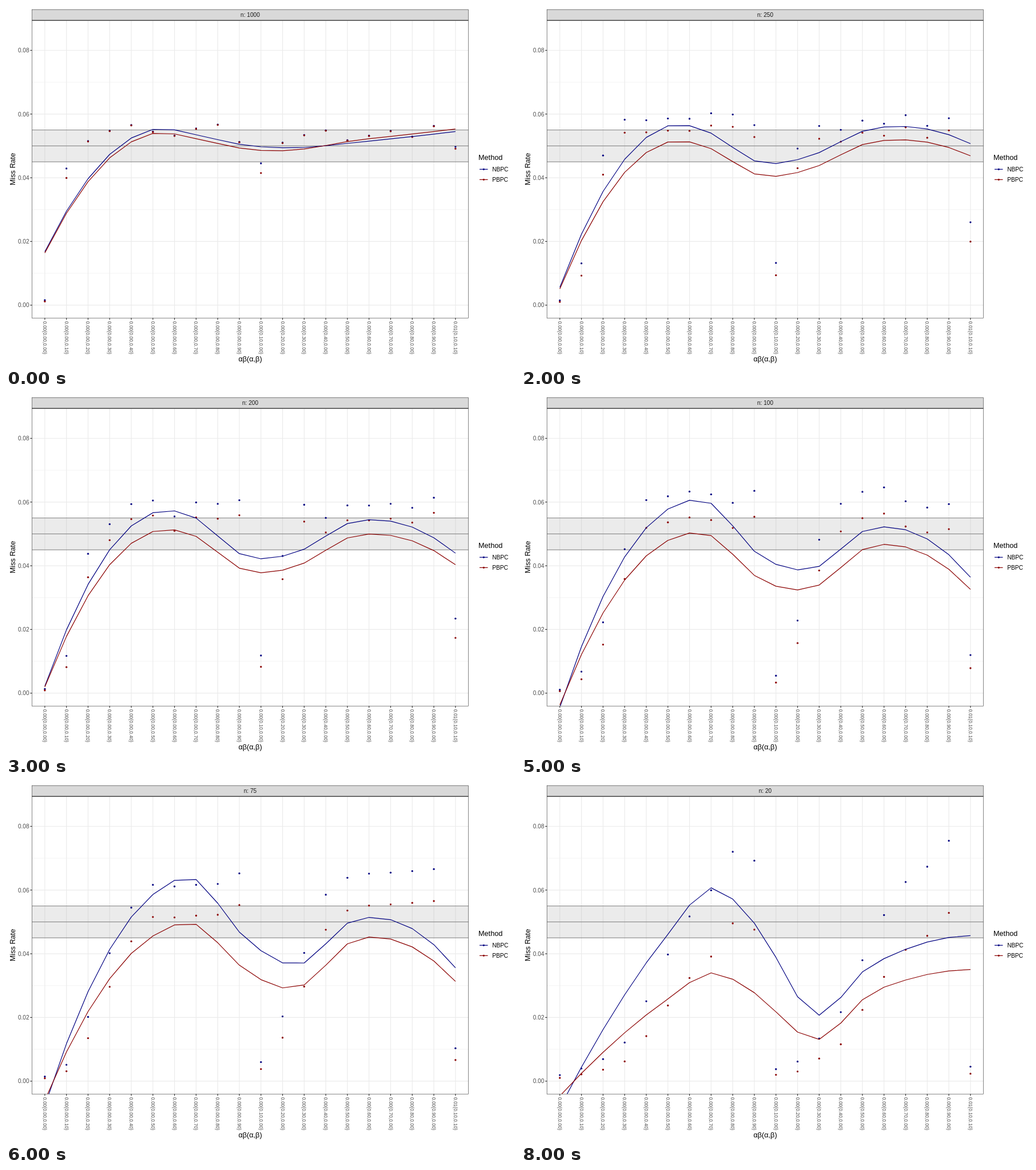
An HTML page for the animation above (9 s loop, 890 by 629 pixels).

```html
<!DOCTYPE html>
<html lang="en">
<head>
<meta charset="utf-8">
<title>Miss rate by sample size</title>
<style>
html, body { margin: 0; width: 100%; height: 100%; overflow: hidden; background: #fff; }
svg { display: block; width: 890px; height: 629px; font-family: "Liberation Sans", Arial, sans-serif; font-size: 10.15px; }
.title { font-size: 12.7px; }
.tick { fill: #4d4d4d; }
.frame { stroke: #333; stroke-width: 0.6; }
.series { fill: none; stroke-width: 1.2; stroke-linejoin: round; }
</style>
</head>
<body>
<svg id="chart" viewBox="0 0 890 629">
  <clipPath id="panel"><rect x="45.5" y="25" width="763" height="520"/></clipPath>
</svg>
<script>
const svg = document.getElementById('chart');
const BLUE = '#000080', RED = '#8b0000', STEP_MS = 1000, TRIALS = 5000;
const LEFT = 45.5, RIGHT = 808.5, TOP = 25, BOTTOM = 545;
const px = i => 67.9 + 37.79 * i;
const py = v => 522.7 - 0.5565 * v;   // v in units of 0.0001

function add(tag, attrs, parent = svg) {
  const el = document.createElementNS('http://www.w3.org/2000/svg', tag);
  for (const key in attrs) el.setAttribute(key, attrs[key]);
  return parent.appendChild(el);
}
function text(x, y, content, attrs) {
  const el = add('text', { x, y, ...attrs });
  el.textContent = content;
  return el;
}
function line(x1, y1, x2, y2, stroke, width) {
  return add('line', { x1, y1, x2, y2, stroke, 'stroke-width': width });
}
const hline = (v, color, width) => line(LEFT, py(v), RIGHT, py(v), color, width);

// Effects in tenths: first β rises alone, then α alone, finally both
const effects = Array.from({ length: 20 }, (_, i) => ({
  a: i === 19 ? 1 : Math.max(0, i - 9),
  b: i === 19 ? 1 : i < 10 ? i : 0,
}));

// Dots: the miss rate climbs to a ceiling with test power, plus sampling error
function noise(n, i) {
  const s = Math.sin(n * 12.9898 + i * 78.233) * 43758.5453;
  return 2 * (s - Math.floor(s)) - 1;
}
function missRate(n, i, ceiling, threshold) {
  const z = Math.hypot(effects[i].a, effects[i].b) / 10 * Math.sqrt(n) - threshold;
  const p = ceiling / (1 + Math.exp(-1.7 * z));
  return 1e4 * (p + noise(n, i) * Math.sqrt(p * (1 - p) / TRIALS));
}
const dotRules = [
  (n, i) => missRate(n, i, 0.05 + 0.115 / Math.sqrt(n), 2.25),
  (n, i) => missRate(n, i, 0.0535, 2.45),
];

// Curves: a smooth path through key heights at these positions
const KNOTS = [0, 2, 5, 7, 9, 12, 14, 16, 19];
function smooth(heights) {
  const last = KNOTS.length - 1;
  const gap = k => KNOTS[k + 1] - KNOTS[k];
  const slope = k => (heights[k + 1] - heights[k]) / gap(k);
  const tangent = k =>
    k === 0 ? 2 * slope(0) - tangent(1) :
    k === last ? 2 * slope(k - 1) - tangent(k - 1) :
    (slope(k - 1) * gap(k) + slope(k) * gap(k - 1)) / (gap(k - 1) + gap(k));
  return effects.map((_, i) => {
    const k = Math.min(last, KNOTS.findIndex(x => x >= i + 0.5) + last + 1) && Math.max(0, KNOTS.filter(x => x <= i).length - 1);
    const j = Math.min(k, last - 1), h = gap(j), t = (i - KNOTS[j]) / h, u = 1 - t;
    return heights[j] * u + heights[j + 1] * t +
      t * u * h * (u * (tangent(j) - slope(j)) - t * (tangent(j + 1) - slope(j)));
  });
}
function redShare(i, early, late) {
  const t = Math.min(1, Math.max(0, (i - 10) / 5));
  return early + (late - early) * t * t * (3 - 2 * t);
}

// early, late: height of the red curve relative to the blue one
const state = (n, heights, early, late) => ({ n, heights, early, late });
const mean = (x, y) => (x + y) / 2;
const between = (n, p, q) => state(n, p.heights.map((h, k) => mean(h, q.heights[k])),
  mean(p.early, q.early), mean(p.late, q.late));

const s1000 = state(1000, [168, 397, 552, 535, 505, 495, 508, 522, 545], 0.977, 1.015);
const s250 = state(250, [56, 357, 563, 540, 453, 479, 546, 561, 507], 0.91, 0.925);
const s150 = state(150, [-12, 326, 570, 559, 423, 425, 519, 519, 372], 0.882, 0.91);
const s75 = state(75, [-77, 281, 586, 633, 468, 371, 496, 507, 356], 0.778, 0.88);
const s50 = state(50, [-105, 253, 578, 644, 447, 322, 480, 511, 376], 0.714, 0.84);
const s20 = state(20, [-83, 162, 461, 607, 496, 207, 343, 414, 457], 0.56, 0.767);
const states = [s1000, between(500, s1000, s250), s250, between(200, s250, s150),
  s150, between(100, s150, s75), s75, s50, s20];

// Grid and tolerance band
for (const v of [100, 300, 500, 700]) hline(v, '#ebebeb', 0.6);
for (const v of [0, 200, 400, 600, 800]) hline(v, '#ebebeb', 1.2);
effects.forEach((_, i) => line(px(i), TOP, px(i), BOTTOM, '#ebebeb', 1.2));
add('rect', { x: LEFT, y: py(550), width: RIGHT - LEFT, height: py(450) - py(550), fill: '#999', 'fill-opacity': 0.2 });
for (const v of [450, 500, 550]) hline(v, '#7f7f7f', 1);

// Changing series
const plot = add('g', { 'clip-path': 'url(#panel)' });
const dots = [BLUE, RED].map(fill =>
  effects.map((_, i) => add('circle', { cx: px(i), r: 1.65, fill }, plot)));
const curves = [BLUE, RED].map(stroke => add('polyline', { class: 'series', stroke }, plot));

// Frame, strip and axes
const box = (y, height, fill) => add('rect', { class: 'frame', x: LEFT, y, width: RIGHT - LEFT, height, fill });
box(TOP, BOTTOM - TOP + 0.2, 'none');
box(6.2, TOP - 6.2, '#d9d9d9');
line(LEFT, TOP + 0.2, RIGHT, TOP + 0.2, '#333', 1);
const strip = text(427, 19.2, '', { 'text-anchor': 'middle', fill: '#1a1a1a' });
for (const v of [0, 200, 400, 600, 800]) {
  line(42.3, py(v), LEFT, py(v), '#333', 1.2);
  text(40.6, py(v) + 3.7, (v / 1e4).toFixed(2), { class: 'tick', 'text-anchor': 'end' });
}
effects.forEach(({ a, b }, i) => {
  line(px(i), BOTTOM, px(i), 548.3, '#333', 1.2);
  text(0, 0, `${(a * b / 100).toFixed(2)}(0.${a}0,0.${b}0)`,
    { class: 'tick', 'font-size': 8.5, transform: `translate(${px(i) - 3} 550.8) rotate(90)` });
});
text(427, 620.5, 'αβ(α,β)', { class: 'title', 'text-anchor': 'middle' });
text(0, 0, 'Miss Rate', { class: 'title', 'text-anchor': 'middle', transform: 'translate(15.6 285) rotate(-90)' });

// Legend
text(826, 268.8, 'Method', { class: 'title' });
[['NBPC', BLUE, 285.3], ['PBPC', RED, 303.3]].forEach(([name, color, y]) => {
  line(828, y, 842.5, y, color, 1.2);
  add('circle', { cx: 835.3, cy: y, r: 1.65, fill: color });
  text(850.3, y + 3.7, name);
});

let shown = -1;
function draw() {
  const index = Math.floor(performance.now() / STEP_MS) % states.length;
  if (index !== shown) {
    shown = index;
    const { n, heights, early, late } = states[index];
    const blue = smooth(heights);
    const red = blue.map((v, i) => v * redShare(i, early, late));
    strip.textContent = `n: ${n}`;
    dots.forEach((row, k) => row.forEach((dot, i) => dot.setAttribute('cy', py(dotRules[k](n, i)))));
    [blue, red].forEach((values, k) =>
      curves[k].setAttribute('points', values.map((v, i) => `${px(i)},${py(v)}`).join(' ')));
  }
  requestAnimationFrame(draw);
}
draw();
</script>
</body>
</html>
```
